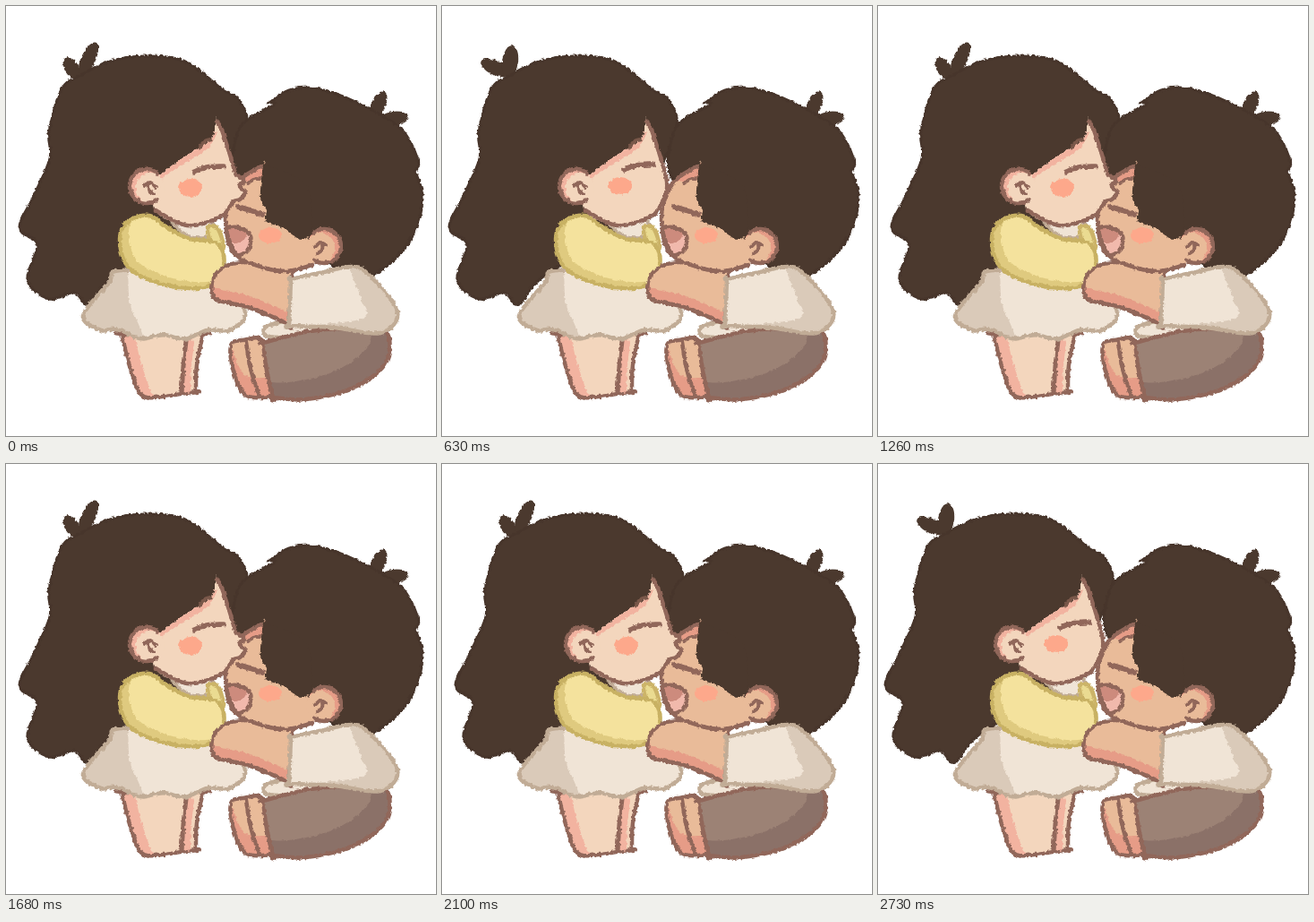
These frames come from a looping animation (480 by 480 pixels, 2940 ms). An HTML page:

```html
<!DOCTYPE html>
<html lang="en">
<head>
<meta charset="utf-8">
<style>
html, body { margin: 0; width: 100%; height: 100%; overflow: hidden; background: #fff; }
svg { display: block; width: 100vw; height: 100vh; }
</style>
</head>
<body>
<svg id="stage" viewBox="0 0 480 480">
  <defs>
    <filter id="crayon" filterUnits="userSpaceOnUse" x="0" y="0" width="480" height="480" color-interpolation-filters="sRGB">
      <feTurbulence type="fractalNoise" baseFrequency=".25" numOctaves="2" seed="4"/>
      <feColorMatrix values="1 0 0 0 0  0 1 0 0 0  0 0 1 0 0  0 0 0 0 1" result="noise"/>
      <feDisplacementMap in="SourceGraphic" in2="noise" scale="4" xChannelSelector="R" yChannelSelector="G"/>
    </filter>
  </defs>
</svg>
<script>
const stage = document.getElementById('stage');
const HAIR = '#4b392e', HAIR_EDGE = '#47352b', LINE = '#91675a';
const FAIR = '#f3d6bd', TAN = '#e9bb99', PINK = '#f2b3a0', ROSE = '#e69c87', BLUSH = '#fda88b';
const CLOTH = '#f0e4d6', CLOTH_DIM = '#dacab9', CLOTH_EDGE = '#c1ac96';
const STEP = 210, LEAN = -7;

function node(tag, attrs, parent) {
  const el = document.createElementNS('http://www.w3.org/2000/svg', tag);
  for (const k in attrs) el.setAttribute(k, attrs[k]);
  parent.appendChild(el);
  return el;
}

const layer = parent => node('g', {
  filter: 'url(#crayon)', 'stroke-linejoin': 'round', 'stroke-linecap': 'round'
}, parent);

// Smooth curve through key points; "!" after a point makes it a corner.
function curve(text, closed = true) {
  const p = text.trim().replace(/(\S+)!/g, '$1 $1').split(/\s+/).map(s => s.split(',').map(Number));
  const n = p.length;
  const at = i => closed ? p[(i + n) % n] : p[Math.max(0, Math.min(n - 1, i))];
  let d = 'M' + p[0];
  for (let i = 0; i < (closed ? n : n - 1); i++) {
    const [a, b, c, e] = [at(i - 1), at(i), at(i + 1), at(i + 2)];
    d += `C${b.map((v, k) => v + (c[k] - a[k]) / 6)} ${c.map((v, k) => v - (e[k] - b[k]) / 6)} ${c}`;
  }
  return d + (closed ? 'Z' : '');
}

function line(g, pts, color = LINE, width = 4.5) {
  node('path', { d: curve(pts, false), fill: 'none', stroke: color, 'stroke-width': width }, g);
}

let clips = 0;
// Shade is what a shifted copy of the shape leaves uncovered, or its own outline.
function shape(g, pts, fill, edge, shade) {
  const d = curve(pts);
  node('path', { d, fill }, g);
  if (shade) {
    const id = 'clip' + clips++;
    node('path', { d }, node('clipPath', { id }, g));
    const inner = node('g', { 'clip-path': `url(#${id})` }, g);
    if (shade.pts) node('path', { d: curve(shade.pts), fill: shade.color }, inner);
    else {
      node('path', { d, fill: shade.color }, inner);
      node('path', { d, fill, transform: `translate(${shade.shift})` }, inner);
    }
  }
  if (edge) node('path', { d, fill: 'none', stroke: edge, 'stroke-width': edge === HAIR_EDGE ? 3 : 4.5 }, g);
}

function oval(g, cx, cy, rx, ry, fill, turn = 0) {
  node('ellipse', { cx, cy, rx, ry, fill, transform: `rotate(${turn} ${cx} ${cy})` }, g);
}

// side is 1 when the ear's outer rim faces right
function ear(g, cx, cy, side, skin, rim) {
  const r = 19;
  const on = deg => {
    const a = deg * Math.PI / 180;
    return `${cx + side * r * Math.cos(a)} ${cy + r * Math.sin(a)}`;
  };
  oval(g, cx, cy, r, r, rim);
  oval(g, cx - side * 4, cy + 2, r - 3, r - 2, skin);
  node('path', {
    d: `M${on(-130)}A${r} ${r} 0 1 ${side > 0 ? 1 : 0} ${on(125)}`,
    fill: 'none', stroke: LINE, 'stroke-width': 4.5
  }, g);
  const x = cx - side * 4;
  line(g, `${x - side * 6},${cy + 1} ${x},${cy - 4} ${x + side * 6},${cy - 1}`, LINE, 4);
  line(g, `${x + side * 2},${cy - 3} ${x + side * 2},${cy + 4} ${x - side * 3},${cy + 8}`, LINE, 4);
}

// Skirt hem: one wide sag with ripples on it
function hem() {
  let pts = '';
  for (let x = 250; x > 95; x -= 12) {
    const sag = Math.sin(Math.PI * (x - 85) / 183);
    pts += `${x},${354 + 16 * sag + 3 * Math.cos(Math.PI * (x - 150) / 25)} `;
  }
  return pts;
}

// Girl: hair behind the body
const hairBack = node('g', {}, stage);
let g = layer(hairBack);
const tufts = [node('g', {}, g), node('g', {}, g)];
oval(tufts[0], 73, 69, 8, 13, HAIR, -30);
oval(tufts[0], 92, 59, 8, 20, HAIR, 25);
oval(tufts[1], 66, 69, 17, 8, HAIR, 25);
oval(tufts[1], 83, 62, 9, 18, HAIR, 8);
shape(g, `82,78 115,62 155,56 200,62 240,92 262,108 266,145 215,240 120,302 93,333 76,320
  48,327 24,306 35,266 15,248 31,212 49,170 48,140 62,93`, HAIR, HAIR_EDGE);

// Girl: legs and clothes
g = layer(stage);
shape(g, '129,366! 138,402 151,434 175,436 212,430! 213,400 220,366!', FAIR, LINE, { color: PINK, shift: '14 0' });
line(g, '206,376 203,402 202,428', PINK, 8);
line(g, '201,374 198,402 196,432', LINE, 5);
shape(g, `130,295 115,309 86,346 ${hem().split(' ').reverse().join(' ')} 267,343 240,300`, CLOTH, CLOTH_EDGE,
  { color: CLOTH_DIM, pts: '130,285 138,330 150,385 60,385 80,320' });
shape(g, '186,238 205,258 232,256 226,238', CLOTH, CLOTH_EDGE);
shape(g, '225,248 236,248 243,270 230,266', '#eadb91', '#ccb469');
shape(g, '127,260 137,240 160,234 181,248 205,260 236,265 243,290 225,313 180,312 138,293', '#f4e29d', '#c8b163',
  { color: '#dfca7f', shift: '10 -7' });

// Boy: legs and shorts
g = layer(stage);
shape(g, '251,379 264,373 288,376 298,436! 268,435 254,408', TAN, LINE, { color: ROSE, shift: '0 -22' });
line(g, '268,375 273,405 283,436');
shape(g, '292,357 335,350 340,367 294,369', CLOTH, CLOTH_EDGE);
shape(g, '287,376! 340,363 400,360 426,366 423,400 386,427 335,439 298,437! 291,407', '#9c8275', LINE,
  { color: '#8b7168', shift: '-20 -19' });

// Boy: hair, arm and shirt
oval(g, 415, 112, 8, 18, HAIR, 25);
oval(g, 432, 126, 17, 8, HAIR, -10);
shape(g, `268,128 300,110 294,108! 316,94 345,92 388,106 440,136 460,172 457,185! 465,214 455,255
  425,290 390,300 300,250 256,190 256,150`, HAIR, HAIR_EDGE);
shape(g, '246,290 231,305 234,327 270,336 316,355! 320,290! 270,286', TAN, LINE, { color: ROSE, shift: '0 -13' });
shape(g, '318,305! 350,298 386,291 405,300 437,341 418,365 366,359 316,357! 317,332', CLOTH, CLOTH_EDGE,
  { color: CLOTH_DIM, pts: '386,288 396,325 400,348 345,357 345,368 445,368 440,310' });

// Boy: face
shape(g, '288,176! 264,192 248,219 244,242 253,276 284,291 325,294 345,285 336,258! 300,240 286,210', TAN);
shape(g, '288,177! 268,190 264,196 288,191!', ROSE);
line(g, '285,179 262,193 250,212 245,238 253,275 284,291 314,296 342,289');
shape(g, '287,176! 284,214 291,228 290,240 309,248 330,261 342,252! 335,200', HAIR);
line(g, '270,198 276,194 283,192', LINE, 4);
line(g, '259,224 272,228 286,233', LINE, 6);
oval(g, 295, 256, 13, 9, BLUSH);
shape(g, '247,249 262,248 273,257 270,272 258,278 251,266', '#cd8b7d', LINE, { color: '#f1b9ac', shift: '-3 -13' });
ear(g, 355, 268, 1, TAN, ROSE);

// Girl: head in front
const head = node('g', {}, stage);
g = layer(head);
const rim = '168,192! 188,176 212,160 230,148 234,126!';
const jaw = '253,219 240,235 202,245 167,228';
const profiles = ['257,188 266,194 261,201 267,208 261,216', '257,190 258,204'].map(lips => {
  const side = `240,136 250,166 ${lips} ${jaw}`;
  const face = node('g', {}, g);
  shape(face, `${rim} ${side}`, FAIR, null, { color: PINK, pts: '160,200 205,152 234,140 224,160 195,178' });
  line(face, `235,129 ${side}`);
  return face;
});
line(g, '216,158 222,151 229,149', '#7a584a');
const features = node('g', {}, g);
line(features, '210,185 224,180 243,179', LINE, 5.5);
oval(features, 206, 203, 13, 10, BLUSH);
ear(g, 157, 201, -1, FAIR, PINK);

const show = (el, on) => el.setAttribute('visibility', on ? 'visible' : 'hidden');

function draw(time) {
  const pose = Math.floor(time / STEP) % 2;
  for (const el of [hairBack, head]) el.setAttribute('transform', `translate(${LEAN * pose} 0)`);
  features.setAttribute('transform', `translate(0 ${-2 * pose})`);
  for (const pair of [tufts, profiles]) pair.forEach((el, i) => show(el, i === pose));
}

const start = performance.now();
function tick() {
  draw(performance.now() - start);
  requestAnimationFrame(tick);
}
tick();
</script>
</body>
</html>
```
